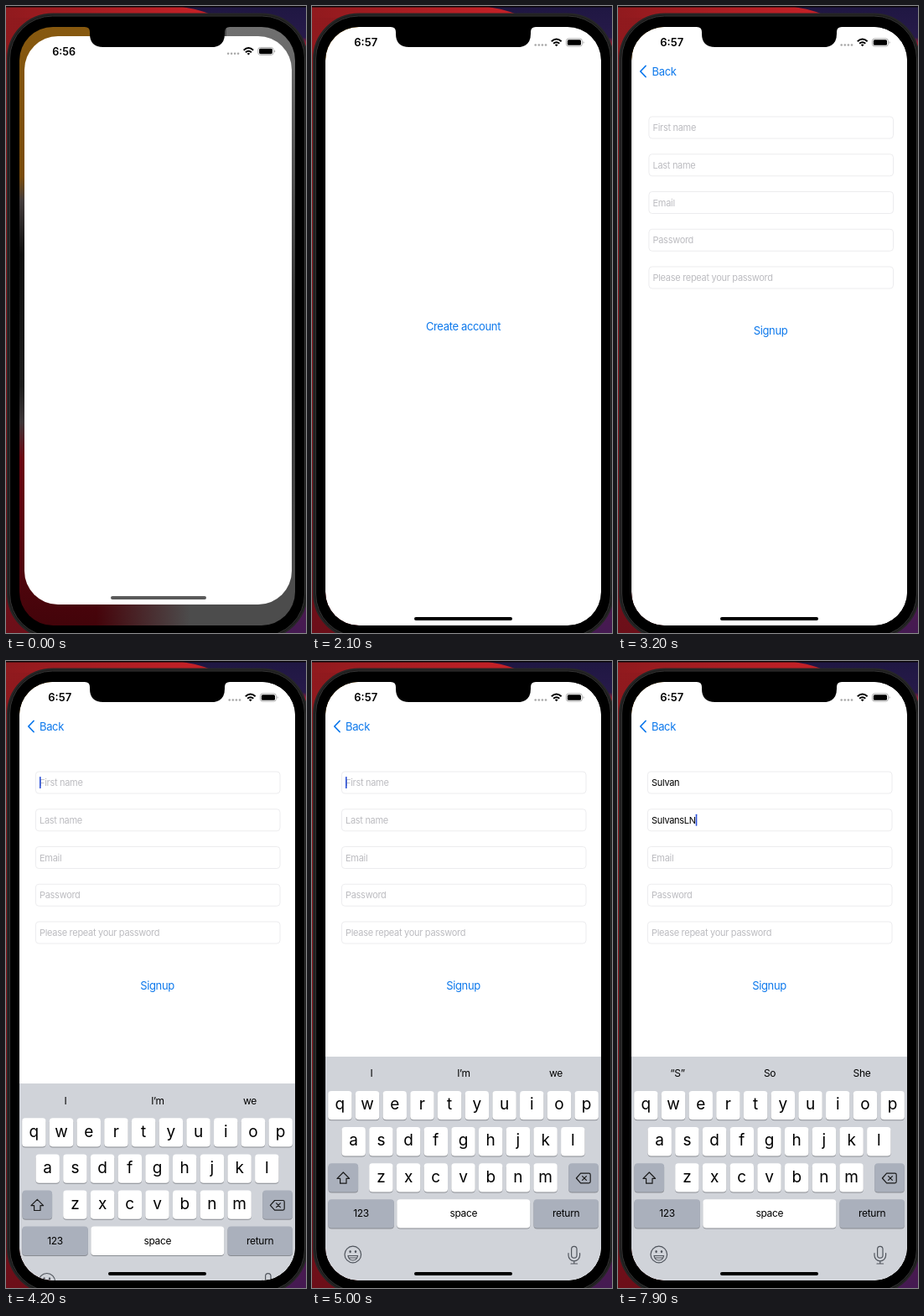
An HTML page that plays this animation: 358x748 px, repeating every 8000 ms.

```html
<!DOCTYPE html>
<html lang="en">
<head>
<meta charset="utf-8">
<title>Sign-up flow</title>
<style>
  :root {
    --blue: #0c78ec;
    --spring: linear(0, .09, .264, .442, .594, .713, .801, .864, .908, .939, .96, .973, .983, .989, .993, .995, .997, .999, 1);
  }
  html, body { margin: 0; width: 100%; height: 100%; overflow: hidden; background: #000; }
  body { position: relative; font-family: Inter, "Liberation Sans", sans-serif; }
  svg { position: absolute; left: 0; top: 0; display: block; }
  text { letter-spacing: -.027em; white-space: pre; }

  .screen {
    position: absolute; left: 16px; top: 25px; width: 329px; height: 714px;
    border-radius: 40px; overflow: hidden;
    background:
      linear-gradient(#707070, #363636 45%, #363636 60%, #4c4c4c 90%) right / 25% 100% no-repeat,
      linear-gradient(90deg, transparent 28%, #4c4c4c 62%),
      linear-gradient(#87590f, #7a4c0c 25%, #433c3c 29%, #0d0d0d 38%, #1c1c1c 60%, #3c3638 66%, #6c0712 72%, #43040a);
  }
  .app {
    position: absolute; left: 0; top: 0; width: 329px; height: 714px;
    border-radius: 40px; overflow: hidden; background: #fff;
    animation: open 8s infinite;
  }
  .view { transform-origin: 0 0; animation: grow 8s infinite; }
  .bar {
    position: absolute; left: 32.2%; width: 35.7%; bottom: 6px; height: 4px;
    border-radius: 2px; background: #000; animation: barInk 8s infinite;
  }
  .app, .view { animation-timing-function: cubic-bezier(.2, .7, .3, 1); }
  @keyframes open {
    0% { left: 6px; top: 11px; width: 319px; height: 678px; }
    5%, 100% { left: 0; top: 0; width: 329px; height: 714px; }
  }
  @keyframes grow { 0% { transform: scale(.9696); } 5%, 100% { transform: none; } }
  @keyframes barInk { 0% { background: #5a5a5a; } 5%, 100% { background: #000; } }

  .link { font-size: 13px; fill: var(--blue); }
  .mid { text-anchor: middle; }
  .clock { font-size: 13px; font-weight: 600; letter-spacing: 0; }
  .start { animation: leave 8s infinite; }
  .start .link { animation: tap 8s infinite; }
  .form { animation: enter 8s infinite; }
  .nav { animation: show 8s infinite; }
  .nav text { animation: back 8s infinite; }
  .shade { animation: shade 8s infinite; }
  .keys { animation: rise 8s infinite; }
  .start, .form, .nav text, .keys { animation-timing-function: var(--spring); }

  @keyframes tap {
    0%, 11.3% { opacity: 0; }
    13%, 33.4% { opacity: 1; }
    34%, 34.8% { opacity: .3; }
    38%, 100% { opacity: 1; }
  }
  @keyframes leave { 0%, 34.81% { transform: none; } 40.97%, 100% { transform: translateX(-99px); } }
  @keyframes enter { 0%, 34.81% { transform: translateX(329px); } 40.97%, 100% { transform: none; } }
  @keyframes back { 0%, 34.81% { transform: translateX(125px); } 40.97%, 100% { transform: none; } }
  @keyframes rise { 0%, 50% { transform: translateY(267px); } 56.16%, 100% { transform: none; } }
  @keyframes shade { 0%, 34.81% { opacity: 0; } 38%, 100% { opacity: .1; } }
  @keyframes show { 0%, 35% { opacity: 0; } 38.5%, 100% { opacity: 1; } }

  .field rect { fill: #fff; stroke: #e8e8ea; stroke-width: .8; }
  .field text { font-size: 11px; }
  .hint { fill: #bcbcc0; }
  .caret { fill: #2b50d8; opacity: 0; }
  .key { fill: #fff; }
  .key.dark { fill: #aab0bc; }
  .drop { fill: #898c92; }
  .letter { font-size: 19px; letter-spacing: 0; text-anchor: middle; }
  .word { font-size: 12px; text-anchor: middle; }
  .line { fill: none; stroke: #1a1a1a; stroke-width: 1.2; stroke-linejoin: round; stroke-linecap: round; }
  .soft { stroke: #50555d; }
</style>
</head>
<body>
<svg width="358" height="748" viewBox="0 0 358 748">
  <defs>
    <linearGradient id="wall" x2="0" y2="1">
      <stop stop-color="#901a1e"/><stop offset=".6" stop-color="#8a141c"/><stop offset="1" stop-color="#6c0f19"/>
    </linearGradient>
    <linearGradient id="glow">
      <stop stop-color="#901a1e"/><stop offset=".9" stop-color="#c32127"/>
    </linearGradient>
    <linearGradient id="dusk" x2="0" y2="1">
      <stop stop-color="#1f1742"/><stop offset=".05" stop-color="#271a4a"/>
      <stop offset=".06" stop-color="#a01f30"/><stop offset=".6" stop-color="#6e1a35"/><stop offset="1" stop-color="#451a52"/>
    </linearGradient>
  </defs>
  <rect width="358" height="748" fill="url(#wall)"/>
  <rect width="250" height="14" fill="url(#glow)"/>
  <path d="M203 0Q235 4 252 14L300 60V748H358V0Z" fill="url(#dusk)"/>
  <rect width="358" height="1.5" fill="#0a0608"/>
  <rect x="2" y="9.5" width="357" height="745" rx="54" fill="#1a1a1a" stroke="#262626" stroke-width="2"/>
  <rect x="4.5" y="12" width="352" height="740" rx="51" fill="#000" stroke="#353535" stroke-width="1"/>
</svg>

<div class="screen">
  <div class="app">
    <svg class="view" width="329" height="714" viewBox="16 25 329 714">
      <g class="start">
        <text class="link mid" x="180.5" y="386.7">Create account</text>
      </g>
      <rect class="shade" x="16" y="25" width="329" height="714"/>
      <g class="form" id="form">
        <rect x="16" y="25" width="329" height="714" fill="#fff"/>
        <text class="link mid" x="180.5" y="392">Signup</text>
      </g>
      <g class="nav">
        <path d="M33 71.5L26.8 78L33 84.5" fill="none" stroke="#0c78ec" stroke-width="1.8" stroke-linecap="round" stroke-linejoin="round"/>
        <text class="link" x="40" y="82.6">Back</text>
      </g>
      <g class="keys" id="keys">
        <rect x="16" y="472" width="329" height="270" fill="#d0d3d9"/>
      </g>
      <text class="clock" id="clock" x="50.3" y="48.3">6:56</text>
      <g fill="#a8a8a8">
        <circle cx="266.7" cy="46.5" r="1.3"/><circle cx="270.8" cy="46.5" r="1.3"/>
        <circle cx="274.9" cy="46.5" r="1.3"/><circle cx="279" cy="46.5" r="1.3"/>
      </g>
      <g fill="none" stroke="#000" stroke-width="2">
        <path d="M285.8 42.2Q291.7 36.7 297.6 42.2"/>
        <path d="M288.1 44.8Q291.7 41.6 295.3 44.8"/>
      </g>
      <path d="M289.8 46.3Q291.7 44.9 293.6 46.3L291.7 48.3Z"/>
      <rect x="303.4" y="38.9" width="19" height="9.2" rx="2.8" fill="none" stroke="#999" stroke-width=".8"/>
      <rect x="304.8" y="40.2" width="16.2" height="6.6" rx="1.5"/>
      <path d="M323.6 42Q325.6 43.5 323.6 45Z" fill="#999"/>
    </svg>
    <div class="bar"></div>
  </div>
</div>

<svg width="358" height="748" viewBox="0 0 358 748">
  <path d="M94 24H267V25Q261 25 261 31V33Q261 49 245 49H116Q100 49 100 33V31Q100 25 94 25Z"/>
</svg>

<script>
  const LOOP = 8000;
  const form = document.getElementById('form');
  const keys = document.getElementById('keys');
  const clock = document.getElementById('clock');

  function add(parent, tag, attrs, label = '') {
    const el = document.createElementNS('http://www.w3.org/2000/svg', tag);
    for (const name in attrs) el.setAttribute(name, attrs[name]);
    el.textContent = label;
    return parent.appendChild(el);
  }

  // Form
  const hints = ['First name', 'Last name', 'Email', 'Password', 'Please repeat your password'];
  const fields = hints.map((hint, i) => {
    const y = 132 + i * 44.75;
    const g = add(form, 'g', { class: 'field' });
    add(g, 'rect', { x: 35.4, y, width: 291.6, height: 26, rx: 3.8 });
    return { hint, y, text: add(g, 'text', { x: 40, y: y + 17, class: 'hint' }, hint) };
  });
  const caret = add(form, 'rect', { class: 'caret', width: 1.6, height: 14, rx: .6 });

  // Keyboard
  function key(cx, y, width, dark) {
    const box = { x: cx - width / 2, width, height: 34.3, rx: 4 };
    add(keys, 'rect', { ...box, y: y + 1, class: 'drop' });
    add(keys, 'rect', { ...box, y, class: dark ? 'key dark' : 'key' });
  }
  ['qwertyuiop', 'asdfghjkl', 'zxcvbnm'].forEach((row, r) => {
    [...row].forEach((ch, i) => {
      const cx = 180.5 + (i - (row.length - 1) / 2) * 32.7;
      const y = 513 + r * 43.1;
      key(cx, y, 28.4);
      add(keys, 'text', { class: 'letter', x: cx, y: y + 22.3 }, ch);
    });
  });
  key(37.3, 599.2, 35.6, true);
  key(324, 599.2, 35.6, true);
  [['123', 58.6, 78.6, true], ['space', 180.8, 159, false], ['return', 303.2, 77.4, true]].forEach(([label, cx, width, dark]) => {
    key(cx, 642.3, width, dark);
    add(keys, 'text', { class: 'word', x: cx, y: 663.3 }, label);
  });
  const words = [71, 181, 291].map(x => add(keys, 'text', { class: 'word', x, y: 496.3 }));

  const icon = (d, soft) => add(keys, 'path', { class: soft ? 'line soft' : 'line', d });
  icon('M37.3 610L44.6 617.4H41V623.2H33.6V617.4H30Z');
  icon('M320.6 611.2H330.4Q332.2 611.2 332.2 613V621Q332.2 622.8 330.4 622.8H320.6L315.4 617Z');
  icon('M322.6 614.6L327.4 619.4M327.4 614.6L322.6 619.4');
  icon('M39 708A9.8 9.8 0 1 0 58.6 708A9.8 9.8 0 1 0 39 708', true);
  icon('M43 709.5H54.6Q53.6 715 48.8 715T43 709.5ZM44 712H53.6', true);
  for (const cx of [45.6, 52]) add(keys, 'ellipse', { cx, cy: 704.6, rx: 1.2, ry: 1.7, fill: '#50555d' });
  icon('M309.6 701.5A3.2 3.2 0 0 1 316 701.5V709A3.2 3.2 0 0 1 309.6 709Z', true);
  icon('M306 706.5V709A6.8 6.8 0 0 0 319.6 709V706.5M312.8 716V719M309 719H316.6', true);

  // Typing
  const entries = [
    { value: 'Sulvan', from: 6300, step: 120 },
    { value: 'SulvansLN', from: 7200, step: 75 }
  ];

  function caretAlpha(t) {
    if (t < 4000) return 0;
    if (t > 6200) return 1;
    const p = (t - 4000) % 1000;
    if (p < 560) return 1;
    return p < 700 ? (700 - p) / 140 : Math.max(0, (p - 850) / 150);
  }

  function setText(el, value) {
    if (el.textContent !== value) el.textContent = value;
  }

  function render(t) {
    setText(clock, t < 2100 ? '6:56' : '6:57');
    entries.forEach(({ value, from, step }, i) => {
      const count = Math.max(0, Math.floor((t - from) / step) + 1);
      const { text, hint } = fields[i];
      setText(text, value.slice(0, count) || hint);
      text.setAttribute('class', count ? '' : 'hint');
    });
    const active = t < 7100 ? 0 : 1;
    const { text, y } = fields[active];
    const typed = t >= entries[active].from;
    caret.setAttribute('x', 40 + (typed ? text.getComputedTextLength() : 0));
    caret.setAttribute('y', y + 6);
    caret.style.opacity = caretAlpha(t);
    const guesses = t < 6300 ? ['I', 'I’m', 'we'] : ['“S”', 'So', 'She'];
    words.forEach((el, i) => setText(el, guesses[i]));
  }

  let begin;
  function tick(now) {
    begin ??= now;
    render((now - begin) % LOOP);
    requestAnimationFrame(tick);
  }
  render(0);
  requestAnimationFrame(tick);
</script>
</body>
</html>
```
